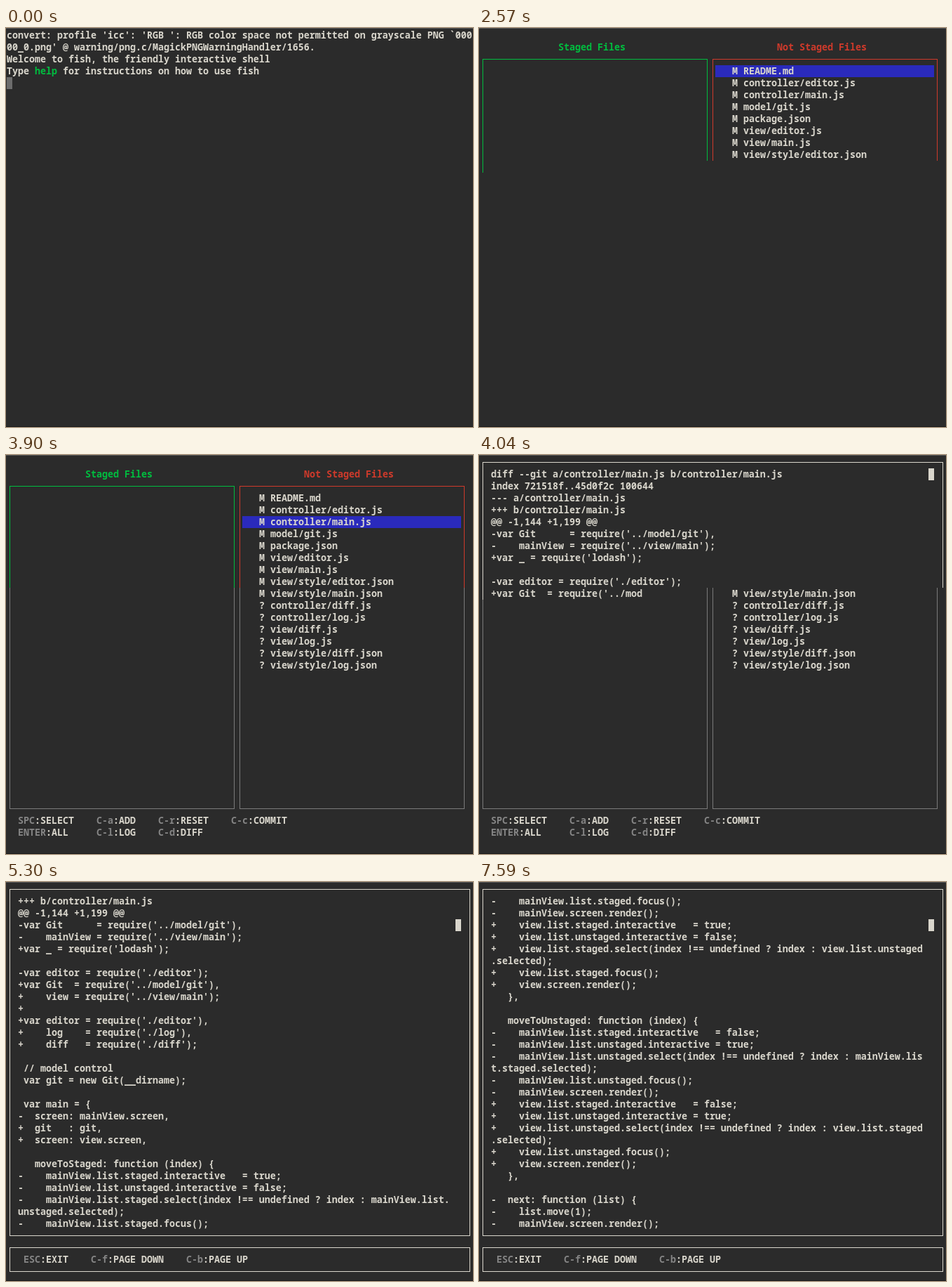
An HTML page that plays this animation: 666x568 px, repeating every 8 s.

```html
<!DOCTYPE html>
<html lang="en">
<head>
<meta charset="utf-8">
<title>Terminal session</title>
<style>
  html, body { margin: 0; width: 100%; height: 100%; overflow: hidden; background: #2b2b2b; }
  svg { display: block; position: absolute; left: 0; top: 0; }
  text { font: 600 13.3333px "Noto Sans Mono", "DejaVu Sans Mono", monospace; white-space: pre; }
</style>
</head>
<body>
<svg id="terminal" width="666" height="568" viewBox="0 0 666 568"></svg>
<script>
const LOOP = 8000, CELL_W = 8, CELL_H = 17;
const INK = '#d9d6cc', GREEN = '#00bd3f', RED = '#cf3a2b', PURPLE = '#5d36d8',
      BLUE = '#3d80e4', GRAY = '#858585', LINE = '#7a7a7a', SELECT = '#2a2abc', CURSOR = '#6c6c6c';

const colX = col => 1 + col * CELL_W;
const rowY = row => 2 + row * CELL_H;
const midX = col => colX(col) + 4;
const midY = row => rowY(row) + 8;

const rect = (x, y, w, h, fill) => `<rect x="${x}" y="${y}" width="${w}" height="${h}" fill="${fill}"/>`;
const write = (col, row, str, fill = INK) =>
  str.trim() ? `<text x="${colX(col)}" y="${rowY(row) + 13}" fill="${fill}">${str}</text>` : '';
const block = (col, row, fill, cols = 1) => rect(colX(col), rowY(row), cols * CELL_W, CELL_H, fill);
const hLine = (c1, c2, row, fill) => rect(midX(c1), midY(row), midX(c2) - midX(c1) + 1, 1, fill);
const vLine = (col, y1, y2, fill) => rect(midX(col), y1, 1, y2 - y1, fill);
const box = (c1, r1, c2, r2, fill) =>
  hLine(c1, c2, r1, fill) + hLine(c1, c2, r2, fill) +
  vLine(c1, midY(r1), midY(r2), fill) + vLine(c2, midY(r1), midY(r2), fill);
const key = (col, row, name, action) =>
  write(col, row, name, GRAY) + write(col + name.length, row, ':' + action);

// Shell
const banner =
  write(0, 0, "convert: profile 'icc': 'RGB ': RGB color space not permitted on grayscale PNG `000") +
  write(0, 1, "00_0.png' @ warning/png.c/MagickPNGWarningHandler/1656.") +
  write(0, 2, 'Welcome to fish, the friendly interactive shell') +
  write(0, 3, 'Type') + write(5, 3, 'help', GREEN) +
  write(10, 3, 'for instructions on how to use fish');

const shell = (command, cursorCol, cursorRow = 4, fill = BLUE) => banner +
  write(0, 4, 'git-commander:', PURPLE) + write(14, 4, 'master*', GREEN) + write(22, 4, 'λ') +
  write(24, 4, command, fill) + block(cursorCol, cursorRow, CURSOR);

// File lists
const files = `M README.md
M controller/editor.js
M controller/main.js
M model/git.js
M package.json
M view/editor.js
M view/main.js
M view/style/editor.json
M view/style/main.json
? controller/diff.js
? controller/log.js
? view/diff.js
? view/log.js
? view/style/diff.json
? view/style/log.json`.split('\n');

const fileRows = (from, to) => files.slice(from, to).map((name, i) => write(45, 3 + from + i, name)).join('');

const listTop = selected =>
  write(14, 1, 'Staged Files', GREEN) + write(53, 1, 'Not Staged Files', RED) +
  [[0, 40, GREEN], [41, 81, RED]].map(([a, b, fill]) =>
    hLine(a, b, 2, fill) + vLine(a, midY(2), rowY(11), fill) + vLine(b, midY(2), rowY(11), fill)).join('') +
  block(42, 3 + selected, SELECT, 39) + fileRows(0, 8);

const listBottom =
  [[0, 40], [41, 81]].map(([a, b]) =>
    vLine(a, rowY(11), midY(29), LINE) + vLine(b, rowY(11), midY(29), LINE) + hLine(a, b, 29, LINE)).join('') +
  fileRows(8) +
  key(2, 30, 'SPC', 'SELECT') + key(16, 30, 'C-a', 'ADD') + key(27, 30, 'C-r', 'RESET') +
  key(40, 30, 'C-c', 'COMMIT') +
  key(2, 31, 'ENTER', 'ALL') + key(16, 31, 'C-l', 'LOG') + key(27, 31, 'C-d', 'DIFF');

const lists = selected => listTop(selected) + listBottom;

// Diff viewer
const diff = `diff --git a/controller/main.js b/controller/main.js
index 721518f..45d0f2c 100644
--- a/controller/main.js
+++ b/controller/main.js
@@ -1,144 +1,199 @@
-var Git      = require('../model/git'),
-    mainView = require('../view/main');
+var _ = require('lodash');

-var editor = require('./editor');
+var Git  = require('../model/git'),
+    view = require('../view/main');
+
+var editor = require('./editor'),
+    log    = require('./log'),
+    diff   = require('./diff');

 // model control
 var git = new Git(__dirname);

 var main = {
-  screen: mainView.screen,
+  git   : git,
+  screen: view.screen,

   moveToStaged: function (index) {
-    mainView.list.staged.interactive   = true;
-    mainView.list.unstaged.interactive = false;
-    mainView.list.staged.select(index !== undefined ? index : mainView.list.
unstaged.selected);
-    mainView.list.staged.focus();
-    mainView.screen.render();
+    view.list.staged.interactive   = true;
+    view.list.unstaged.interactive = false;
+    view.list.staged.select(index !== undefined ? index : view.list.unstaged
.selected);
+    view.list.staged.focus();
+    view.screen.render();
   },

   moveToUnstaged: function (index) {
-    mainView.list.staged.interactive   = false;
-    mainView.list.unstaged.interactive = true;
-    mainView.list.unstaged.select(index !== undefined ? index : mainView.lis
t.staged.selected);
-    mainView.list.unstaged.focus();
-    mainView.screen.render();
+    view.list.staged.interactive   = false;
+    view.list.unstaged.interactive = true;
+    view.list.unstaged.select(index !== undefined ? index : view.list.staged
.selected);
+    view.list.unstaged.focus();
+    view.screen.render();
   },

-  next: function (list) {
-    list.move(1);
-    mainView.screen.render();
-  },

-  prev: function (list) {`.split('\n');

const diffRows = (offset, from = 1, to = 28) =>
  diff.slice(offset + from - 1, offset + to).map((line, i) => write(2, from + i, line)).join('');

const viewer = (rows, cursorRow) =>
  box(0, 0, 82, 29, INK) + box(0, 30, 82, 32, INK) + rows + block(80, cursorRow, INK) +
  key(3, 31, 'ESC', 'EXIT') + key(15, 31, 'C-f', 'PAGE DOWN') + key(32, 31, 'C-b', 'PAGE UP');

const viewerOpening = listBottom +
  hLine(0, 82, 0, INK) + vLine(0, midY(0), rowY(12), INK) + vLine(82, midY(0), rowY(11), INK) +
  diffRows(0, 1, 10) + write(2, 11, diff[10].slice(0, 27)) + block(80, 1, INK);

const scenes = [
  [0, banner + block(0, 4, CURSOR)],
  [220, shell('.', 25, 4, RED)],
  [750, shell('./', 26)],
  [830, shell('./b', 27)],
  [910, shell('./bin/g', 31)],
  [990, shell('./bin/git-commander', 44)],
  [1330, shell('./bin/git-commander', 0, 5)],
  [2570, listTop(0) + vLine(0, rowY(11), rowY(12), GREEN)],
  [2850, lists(0)],
  [2950, lists(1)],
  [3900, lists(2)],
  [4040, viewerOpening],
  [5200, viewer(diffRows(0), 1)],
  [5300, viewer(diffRows(3), 3)],
  [7160, viewer(diffRows(33, 1, 16) + write(2, 17, '+') + diffRows(3, 18), 6)],
  [7490, viewer(diffRows(33), 6)],
  [7590, viewer(diffRows(30), 3)]
];

const terminal = document.getElementById('terminal');
terminal.innerHTML = rect(0, 0, 666, 568, '#2b2b2b') + rect(0, 0, 666, 1, '#565656') +
  rect(0, 567, 666, 1, '#1c1c1c') +
  scenes.map(([, content]) => `<g display="none">${content}</g>`).join('');
const groups = terminal.querySelectorAll('g');

let shown = -1;
function tick() {
  const time = performance.now() % LOOP;
  const current = scenes.findLastIndex(([start]) => start <= time);
  if (current !== shown) {
    groups.forEach((g, i) => g.setAttribute('display', i === current ? 'inline' : 'none'));
    shown = current;
  }
  requestAnimationFrame(tick);
}
tick();
</script>
</body>
</html>
```
